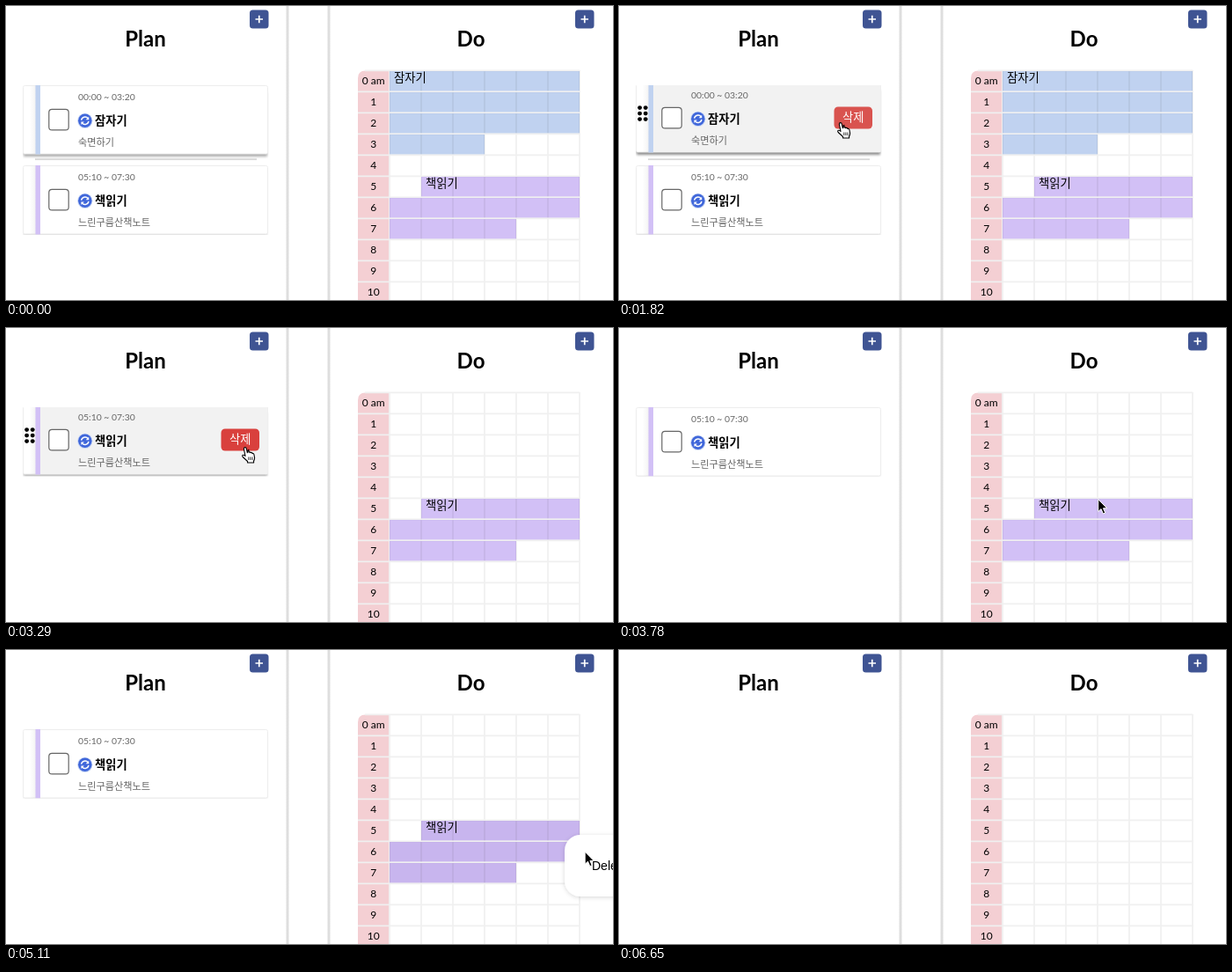
Recreate the animation shown at these times as an HTML page. Size 690 by 334 pixels, loop 7.35 s.

```html
<!DOCTYPE html>
<html lang="ko">
<head>
<meta charset="utf-8">
<title>Plan and Do</title>
<style>
  html, body { margin: 0; width: 100%; height: 100%; overflow: hidden; background: #fff; }
  svg { display: block; width: 690px; height: 334px; }
  text { font: 13.3px Lato, "Noto Sans CJK KR", "Noto Sans CJK", sans-serif; }
  .heading { font-size: 24px; font-weight: 700; text-anchor: middle; }
  .hour { font-size: 12px; text-anchor: middle; }
  .time { font-size: 10.4px; fill: #666; }
  .title { font-weight: 700; }
  .note { font-size: 11.15px; fill: #666; }
  .block rect { mix-blend-mode: multiply; }
</style>
</head>
<body>
<svg id="stage" viewBox="0 0 690 334"></svg>
<script>
const LOOP = 7350, STEP = 70;
const BLUE = "#c0d2f0", PURPLE = "#d2c0f6", PURPLE_HOVER = "#c8b5ee";
const FIRST_DELETED = 2590, MENU_OPENED = 4340, SECOND_DELETED = 5880;

const rect = (x, y, w, h, attrs = "") =>
  `<rect x="${x}" y="${y}" width="${w}" height="${h}" ${attrs}/>`;
const text = (x, y, label, cls = "", attrs = "") =>
  `<text x="${x}" y="${y}" class="${cls}" ${attrs}>${label}</text>`;
const line = d => `<path d="${d}" fill="none" stroke="#f0f0f0" stroke-width="1.7"/>`;
const range = n => [...Array(n).keys()];

const addButton = x => rect(x, 4.5, 21.5, 21, 'rx="3.5" fill="#3f5493"') +
  `<path d="M${x + 6.5} 15h8.5m-4.25-4.25v8.5" stroke="#fff" stroke-width="1.7"/>`;

const syncIcon = `<g transform="translate(89.8 130.3)" fill="none" stroke="#fff" stroke-width="1.4">
  <circle r="8.6" fill="#c9d7f5" stroke="none"/><circle r="7.7" fill="#4067da" stroke="none"/>
  <path d="M-4.2-.7A4.3 4.3 0 0 1 3.4-2.6M4.2.7A4.3 4.3 0 0 1-3.4 2.6"/>
  <path d="M4.4-4.6v3.5H.9zM-4.4 4.6V1.1H-.9z" fill="#fff" stroke="none"/></g>`;

const grip = range(6).map(i =>
  `<circle cx="${23.6 + (i % 2) * 6.6}" cy="${117.6 + (i >> 1) * 6.5}" r="2.45"/>`).join("");

const card = (id, color, time, title, note) => `<g id="${id}">
  ${rect(20, 98, 277, 73, 'class="shadow" filter="url(#soft)"')}
  ${rect(19.5, 90.5, 278, 77.5, 'rx="2" fill="#fff" stroke="#ededed"')}
  ${rect(34, 90.5, 263.5, 77.5, 'class="tint" fill="#f2f2f2"')}
  ${rect(27, 91, 7, 77, 'fill="url(#fade)"')}
  ${rect(33.5, 90, 5.5, 78.5, `fill="${color}"`)}
  <g class="grip">${grip}</g>
  ${rect(48.8, 117.3, 22.4, 23.6, 'rx="3.5" fill="#fff" stroke="#666" stroke-width="1.2"')}
  ${syncIcon}
  ${text(82, 107.3, time, "time")}
  ${text(101, 135, title, "title")}
  ${text(82, 158.5, note, "note")}
  <g class="remove">
    ${rect(244.5, 116.5, 43.5, 25, 'rx="4.5"')}
    ${text(266.2, 132.6, "삭제", "", 'fill="#fff" text-anchor="middle"')}
  </g></g>`;

// spans: [row, first column, end column]
const block = (id, color, title, spans) => `<g id="${id}" class="block" fill="${color}">
  ${spans.map(([row, from, to]) =>
    rect(436 + from * 36, 74 + row * 24, (to - from) * 36, 22.4)).join("")}
  ${text(441 + spans[0][1] * 36, 86.3 + spans[0][0] * 24, title, "", 'fill="#000"')}</g>`;

const hours = range(11);
const timetable =
  `<path d="M400 334V82q0-8.5 8.5-8.5H435.5V334z" fill="#f4cfd3"/>` +
  line(range(12).map(i => `M400 ${73.3 + i * 24}`.replace("400", i ? 400 : 408) + "H652").join("")) +
  line(range(7).map(i => `M${436 + i * 36} 73V334`).join("")) +
  hours.map(i => text(417.7, 89.2 + i * 24, i || "0 am", "hour")).join("");

const stage = document.getElementById("stage");
stage.innerHTML = `
  <defs>
    <filter id="soft"><feGaussianBlur stdDeviation="1.6"/></filter>
    <filter id="menuShadow" x="-30%" y="-30%" width="160%" height="160%">
      <feDropShadow dx="0" dy="1" stdDeviation="2.5" flood-opacity=".16"/></filter>
    <linearGradient id="fade"><stop stop-opacity="0"/><stop offset="1" stop-opacity=".05"/></linearGradient>
    <linearGradient id="edge"><stop stop-color="#fff"/><stop offset=".5" stop-color="#d6d6d6"/>
      <stop offset="1" stop-color="#fff"/></linearGradient>
    <clipPath id="listClip"><rect id="listArea" x="19" y="90" width="279.5"/></clipPath>
  </defs>
  ${rect(0, 0, 690, 334, 'fill="#fff"')}
  ${rect(317.5, 0, 5, 334, 'fill="url(#edge)"')}${rect(364.5, 0, 5, 334, 'fill="url(#edge)"')}
  ${text(158.5, 46, "Plan", "heading")}${text(528.5, 46, "Do", "heading")}
  ${addButton(277)}${addButton(647)}
  ${timetable}
  ${block("sleepBlock", BLUE, "잠자기", [[0, 0, 6], [1, 0, 6], [2, 0, 6], [3, 0, 3]])}
  ${block("readBlock", PURPLE, "책읽기", [[5, 1, 6], [6, 0, 6], [7, 0, 4]])}
  <g clip-path="url(#listClip)">
    ${rect(33, 173.3, 252, 1.8, 'id="gapLine" fill="#d8d8d8"')}
    ${card("sleepCard", BLUE, "00:00 ~ 03:20", "잠자기", "숙면하기")}
    ${card("readCard", PURPLE, "05:10 ~ 07:30", "책읽기", "느린구름산책노트")}
  </g>
  <g id="menu">
    ${rect(635, 210, 110, 70, 'rx="18" fill="#fff" filter="url(#menuShadow)"')}
    ${text(666, 250, "Delete", "", 'style="font:14px \'Liberation Sans\',sans-serif"')}
  </g>
  <g id="cursor" stroke-linejoin="round">
    <path id="arrow" d="M0 0V14L3.3 11 5.6 16.4 8 15.4 5.7 10.2H10Z" stroke="#fff"/>
    <g id="hand" stroke="#000" stroke-width="1.1">
      <path fill="#fff" d="M4 10.5 2.4 2.4Q2.3.7 3.7.6 5 .5 5.3 2L6.3 6.6Q8-.0 8 6.2 8.9 5.4 9.7 6.6 11 5.8 12 7.4 13.6 7 14 9L14.6 12.5Q14.6 14.5 13.6 15.8V18H6.6V16.5L1.2 11.5Q.1 9.8 1.5 9.2 2.7 9 4 10.5Z"/>
      <path d="M7.8 11.5v3.5m2.1-3.5v3.5m2.1-3.5v3.5" stroke-width=".8"/>
    </g>
  </g>`;

const el = id => document.getElementById(id);
const show = (node, visible) => { node.style.display = visible ? "" : "none"; };
const ramp = (t, from, to) => Math.min(1, Math.max(0, (t - from) / (to - from)));
const between = (t, from, to) => t >= from && t < to;

// pointer stops: [ms, x, y]
const stops = [
  [560, 307, 280], [1120, 262, 119], [1190, 262, 119], [1330, 238, 97], [1610, 238, 97],
  [1680, 248, 132], [1820, 248, 132], [2170, 256, 134], [2590, 256, 134], [2870, 268, 135],
  [3290, 268, 135], [3990, 621, 211], [4060, 628, 211], [4130, 636, 210], [4760, 636, 210],
  [5390, 674, 243], [6440, 674, 243], [6580, 556, 325], [6650, 552, 340]
];

function pointerAt(t) {
  const i = Math.max(1, stops.findIndex(stop => stop[0] > t));
  const [t0, x0, y0] = stops[i - 1], [t1, x1, y1] = stops[i];
  const k = ramp(t, t0, t1), eased = k * k * (3 - 2 * k);
  return [x0 + (x1 - x0) * eased, y0 + (y1 - y0) * eased];
}

function drawCard(id, slot, hover, hovered, shade, press) {
  const node = el(id), part = name => node.querySelector("." + name);
  node.setAttribute("transform", `translate(0 ${slot * 91 - hover * 2})`);
  part("tint").style.opacity = hover;
  part("shadow").style.opacity = shade + hover * 0.12;
  show(part("grip"), hovered);
  part("remove").style.opacity = hover;
  part("remove").firstElementChild.setAttribute("fill", `rgb(217 ${83 - press * 19} ${79 - press * 18})`);
}

function draw(t) {
  const both = t < FIRST_DELETED, reading = t < SECOND_DELETED;
  const sleepHover = ramp(t, 1610, 1750);
  const readHover = ramp(t, FIRST_DELETED, 2870) * (1 - ramp(t, 3360, 3570));

  show(el("sleepCard"), both);
  show(el("sleepBlock"), both);
  show(el("gapLine"), both);
  show(el("readCard"), reading);
  show(el("readBlock"), reading);
  el("listArea").setAttribute("height", both ? 170 : 78.5);
  drawCard("sleepCard", 0, sleepHover, t >= 1680, 0.33, ramp(t, 1820, 2170));
  drawCard("readCard", both ? 1 : 0, readHover, between(t, FIRST_DELETED, 3430), 0.15, 1);
  el("readBlock").setAttribute("fill", t >= MENU_OPENED ? PURPLE_HOVER : PURPLE);

  el("menu").style.opacity = ramp(t, MENU_OPENED - STEP, 4480) * (1 - ramp(t, 5740, 5950));

  show(el("cursor"), between(t, 560, 6650));
  const pointing = between(t, 1680, 3360) || between(t, 5250, SECOND_DELETED);
  show(el("hand"), pointing);
  show(el("arrow"), !pointing);
  el("cursor").setAttribute("transform", `translate(${pointerAt(Math.min(t, 6640)).join(" ")})`);
}

const start = performance.now();
function tick() {
  const t = (performance.now() - start) % LOOP;
  draw(Math.floor(t / STEP) * STEP);
  requestAnimationFrame(tick);
}
tick();
</script>
</body>
</html>
```
